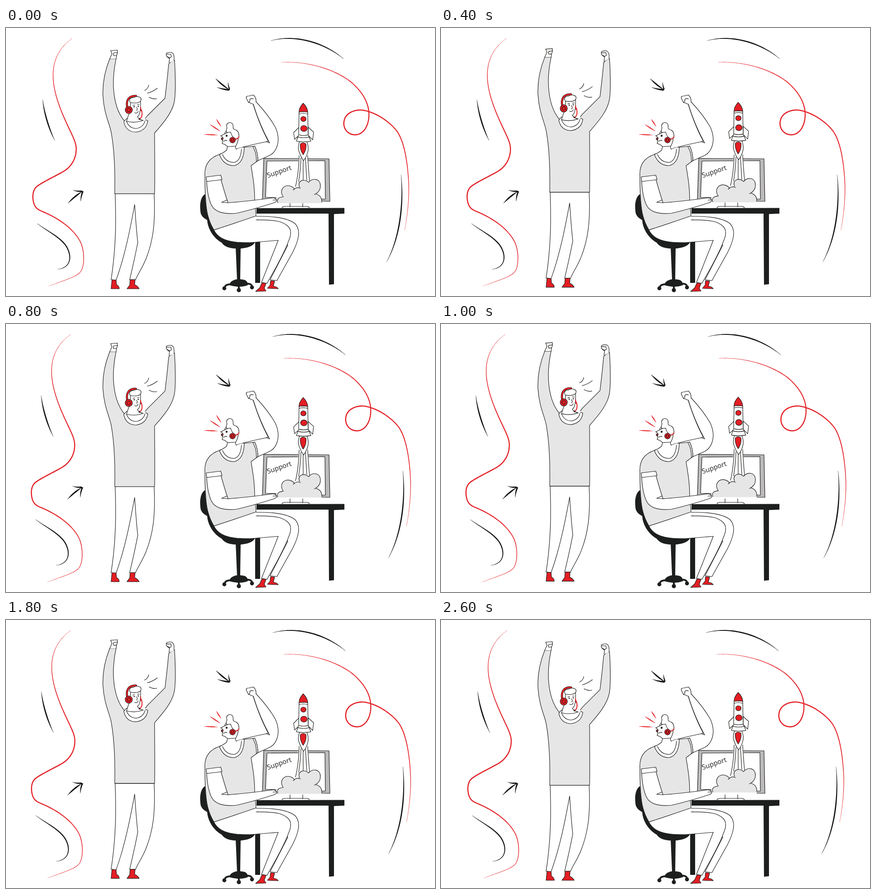
An HTML page for the animation above (2800 ms loop, 947x592 px).

```html
<!DOCTYPE html>
<html lang="en">
<head>
<meta charset="utf-8">
<title>Support launch</title>
<style>
html, body { margin: 0; width: 100%; height: 100%; overflow: hidden; background: #fff; }
svg { display: block; width: 947px; height: 592px; }
svg * { stroke-linecap: round; stroke-linejoin: round; }
path, circle, ellipse { fill: #fff; stroke: #1d1d1b; stroke-width: 1.15; }
.line { fill: none; }
.grey { fill: #e6e6e6; }
.bezel { fill: #bcbabb; }
.red { fill: #e31e24; }
.black { fill: #1d1f1f; stroke: none; }
.fill { stroke: none; }
.leg { fill: none; stroke: #1d1f1f; stroke-width: 4; }
.wire { fill: none; stroke: #e31e24; stroke-width: 2; }
.brush { fill: #111; stroke: none; }
.brush.red { fill: #e31e24; }
text { font: 15px "Open Sans", Lato, sans-serif; fill: #1d1d1b; }
</style>
</head>
<body>
<svg viewBox="0 0 947 592">
  <g id="left"></g>
  <g id="right"></g>
  <g id="arrowLeft"></g>
  <g id="arrowRight"></g>

  <g id="standing">
    <!-- trousers and boots -->
    <path d="M241 366C243 430 243 485 232 556L243 557C262 505 274 445 284 390C286 420 288 450 291 474L290 478C285 505 279 530 273 556L286 556C290 545 300 532 309 510C325 470 330 430 327 366Z"/>
    <path class="red" d="M234 556L243 557L244 567Q250 570 250 576L232 576Z"/>
    <path class="red" d="M274 556L285 556L284 567Q291 570 294 576L267 576L273 568Z"/>
    <!-- shirt -->
    <path class="grey" d="M229 68C218 95 213 125 214 150C217 195 230 212 233 235C239 270 241 320 240 366L328 366C329 320 328 280 328 232C350 207 366 187 371 165C375 150 374 100 372 71Q363 74 359 80C357 105 354 130 351 155L312 194L305 203L262 206C255 198 247 185 242 165C236 140 234 110 243 68Z"/>
    <path d="M260 207Q265 230 287 230Q310 227 313 205L307 202L266 200Z"/>
    <path d="M266 206Q272 222 288 222Q304 219 307 204"/>
    <path class="fill" d="M264 203L309 200L306 206Q287 211 267 207Z"/>
    <!-- fists -->
    <path d="M229 68L234 57L231 50L246 49L246 55L244 61L243 68"/>
    <path class="line" d="M246 54L238 55Q236 58 238 61L244 61"/>
    <path d="M360 77L361 66L354 62L354 56Q358 53 366 54Q371 58 371 64L371 72"/>
    <path class="line" d="M354 58L364 58L365 64L360 67L356 64"/>
    <!-- head -->
    <path d="M275 162L274 184Q269 195 266 206Q285 211 303 204Q294 203 290 196Q298 192 297 161Z"/>
    <path class="line" d="M268 177C264 160 271 149 287 150" style="stroke-width:4.6"/>
    <path class="wire" d="M268 177C264 160 271 149 287 150" style="stroke-width:3"/>
    <path d="M275 165C270 160 274 153 281 154C289 149 300 152 298 159C297 165 287 167 275 165Z"/>
    <circle class="red" cx="271" cy="181" r="8"/>
    <circle class="red" cx="271" cy="181" r="4"/>
    <path class="wire" d="M297 175L298 183M299 181Q303 196 295 201"/>
    <circle class="red" cx="294.5" cy="201" r="1.3"/>
    <path class="line" d="M280 171L284 170M290 169L294 169M288 175Q292 181 288 182M284 187Q289 190 292 184"/>
    <circle class="black" cx="283" cy="174" r="1.4"/><circle class="black" cx="292" cy="173" r="1.4"/>
    <path class="line" d="M315 126Q314 134 306 138M334 133Q324 141 312 144M316 153Q325 158 333 156"/>
  </g>

  <!-- monitor -->
  <path class="bezel" d="M569 288L713 289L715 383L566 378Z"/>
  <path d="M576 294L704 293L705 378L573 374Z"/>
  <path class="fill" d="M597 372L697 372L697 390L597 390Z"/>
  <text transform="translate(578 331) rotate(-19)">Support</text>
  <path d="M627 386L627 395M655 386L655 395M609 398Q610 394 616 394L664 394Q669 394 670 398"/>

  <g id="rocket">
    <path class="fill" d="M647 280L666 280L673 345L638 352Z"/>
    <path class="line" d="M647 282C647 305 643 335 639 350M651 287C651 308 648 325 646 340M656 292L656 336M661 287L664 336M666 282C667 305 669 325 670 338"/>
    <path class="grey fill" d="M600 387Q596 374 612 373C602 358 614 345 627 349Q634 351 637 356L646 350C642 338 658 331 668 341C676 330 695 332 694 350Q694 361 687 367Q698 371 697 387Z"/>
    <path class="line" d="M600 386Q596 374 612 373C602 358 614 345 627 349Q634 351 637 356M634 358Q641 350 650 354M648 351C642 338 658 331 668 341C676 330 695 332 694 350Q694 361 681 368M685 367Q698 371 697 385"/>
    <path d="M648 251Q644 262 646 270Q650 284 657 293Q665 282 667 270Q668 260 664 251Z"/>
    <path class="red" d="M650 256Q656 251 662 256Q664 268 656 280Q648 268 650 256Z"/>
    <path d="M647 219L635 231L637 246L647 237ZM667 219L679 230L677 247L667 237Z"/>
    <path d="M647 185L646 236L641 250Q657 253 673 250L667 236L666 185Z"/>
    <path class="line" d="M647 236Q657 239 667 236M645 241Q657 244 669 241M647 190Q656 187 666 190"/>
    <path class="red" d="M656 166Q646 177 647 186Q656 183 666 186Q666 176 656 166Z"/>
    <ellipse class="red" cx="656.5" cy="201" rx="6" ry="5.5"/>
    <ellipse class="red" cx="657.5" cy="222" rx="7.3" ry="6.5"/>
  </g>

  <!-- desk and chair -->
  <path class="black" d="M553 398L747 397.5L747 410L724 411L724 566L713 567L712 410L553 410ZM550 440L561 440L561 563L550 563Z"/>
  <path class="black" d="M442 366C428 370 427 395 430 410C433 418 440 422 444 424C446 447 460 465 476 474C484 486 500 488 520 487Q546 484 550 472L480 464L450 410Z"/>
  <path class="black" d="M507 484L518 484L517 555L525 556Q534 558 534 568Q515 575 493 568Q494 558 510 555Z"/>
  <path class="leg" d="M497 566Q485 566 483 572M530 565Q541 564 543 570M514 567L514 576"/>
  <circle class="black" cx="482" cy="575" r="4.4"/>
  <circle class="black" cx="514" cy="579" r="4.6"/>
  <circle class="black" cx="543" cy="573" r="4.4"/>

  <!-- seated legs -->
  <path d="M537 417C580 414 620 418 638 432C652 447 646 470 632 497L598 558L583 556L622 480L600 440Z"/>
  <path d="M459 446C470 470 500 475 540 474L601 469L564 562L576 564C590 540 615 495 624 470C634 447 627 436 605 428C585 423 560 424 537 424L552 415Z"/>
  <path class="fill" d="M462 446L552 414L554 423L500 450Z"/>
  <path class="red" d="M565 563L574 564L570 575L574 581L551 582L560 574Z"/>
  <path class="red" d="M584 558L593 559L590 570Q599 572 601 576L577 575L583 568Z"/>

  <!-- raised arm -->
  <path d="M508 268C535 258 560 255 575 251L579 250Q560 215 545 166L552 163Q580 193 595 220C608 250 597 273 583 281L554 294L540 303Z"/>
  <path class="line" d="M545 166Q560 215 582 254L575 251"/>
  <path d="M545 168L535 164L531 156Q528 150 537 150L546 148Q553 154 552 164"/>
  <path class="line" d="M535 164Q540 163 538 158Q542 154 546 157"/>

  <!-- seated shirt -->
  <path class="grey" d="M472 279C450 286 438 300 439 325C439 360 440 390 445 412Q450 432 459 446Q485 438 552 415L549 380C549 350 545 330 541 304L556 293Q556 276 549 261L520 264Z"/>
  <path d="M545 262Q553 275 553 295L556 293Q556 276 549 261Z"/>
  <path d="M471 279Q480 304 503 304Q525 300 526 263L519 264L477 277Z"/>
  <path d="M477 277Q484 297 504 297Q519 293 520 264"/>
  <path class="fill" d="M475 278L487 250L507 260L508 268L522 263L518 270L479 279Z"/>
  <path class="line" d="M489 262L487 270Q480 276 472 279M507 260Q505 266 509 268"/>

  <!-- forearm on the desk -->
  <path d="M443 338C444 360 447 378 454 392C462 408 485 412 510 409C545 401 570 393 592 386L597 383Q599 377 590 375L575 377Q530 383 490 386Q483 365 474 333Z"/>
  <path class="line" d="M488 380L476 385L490 386M589 380L597 380"/>
  <path d="M442 329L474 325L477 335L443 339Z"/>

  <!-- seated head -->
  <path d="M487 226L481 235L474 238L479 242L475 245L479 249L477 255Q486 258 489 262L507 261Q515 248 512 235Z"/>
  <path d="M487 231C484 224 490 222 487 218C486 211 492 208 496 209C504 211 500 219 502 223Q516 226 514 242L508 246Q498 241 496 230Z"/>
  <path class="red" d="M475 243L480 244L477 248Z"/>
  <path class="line" d="M483 234L489 231M481 250Q485 247 488 249"/>
  <circle class="black" cx="487" cy="238" r="2.2"/>
  <path class="wire" d="M504 245Q512 246 514 240"/>
  <circle class="red" cx="500" cy="247.5" r="6.3"/>
  <circle class="red" cx="500" cy="247.5" r="3"/>
  <g id="shout"></g>
</svg>
<script>
const $ = id => document.getElementById(id);

// Ink stroke that swells in the middle and tapers to both ends
function brush(parent, d, width, colour = "") {
  const path = document.createElementNS("http://www.w3.org/2000/svg", "path");
  path.setAttribute("d", d);
  $(parent).append(path);
  const length = path.getTotalLength(), steps = Math.ceil(length / 4);
  const sideA = [], sideB = [];
  for (let i = 0; i <= steps; i++) {
    const at = length * i / steps;
    const p = path.getPointAtLength(at);
    const a = path.getPointAtLength(Math.max(0, at - .5));
    const b = path.getPointAtLength(Math.min(length, at + .5));
    const angle = Math.atan2(b.y - a.y, b.x - a.x);
    const half = .2 + width / 2 * Math.sin(Math.PI * i / steps);
    const dx = -Math.sin(angle) * half, dy = Math.cos(angle) * half;
    sideA.push([p.x + dx, p.y + dy]);
    sideB.unshift([p.x - dx, p.y - dy]);
  }
  path.setAttribute("d", "M" + sideA.concat(sideB).join("L") + "Z");
  path.setAttribute("class", "brush " + colour);
}

brush("left", "M146 23C115 45 103 75 104 108C105 145 122 185 135 213C145 235 155 252 155 267C155 290 143 308 125 318C105 329 80 341 68 350C60 357 58 369 60 381C63 398 70 401 82 406C115 420 150 443 165 474C172 490 174 515 168 532C163 548 140 553 95 570", 2.1, "red");
brush("left", "M81 158C84 190 97 228 108 249", 2.4);
brush("left", "M69 432C90 448 120 462 133 482C147 505 143 530 114 533", 2);
brush("right", "M585 28C635 14 700 30 745 68", 2.2);
brush("right", "M609 76C660 73 720 88 760 118C790 143 803 170 801 197C799 220 787 236 770 236C752 235 744 220 746 207C748 190 765 181 783 181C810 183 845 204 863 228C880 252 887 300 889 345C890 380 886 415 880 447", 2.1, "red");
brush("right", "M872 324C879 400 866 470 840 517", 2.3);
for (const d of ["M137 387Q152 371 170 360", "M148 358Q158 362 170 360Q165 372 165 383"])
  brush("arrowLeft", d, 2.8);
for (const d of ["M463 112Q478 127 494 137", "M466 131Q480 136 494 137Q491 130 490 120"])
  brush("arrowRight", d, 2.8);
for (const d of ["M464 201L475 218", "M450 213L473 228", "M437 235L467 236.5"])
  brush("shout", d, 1.8, "red");

// Keys are [step, offset]
const STEP = 200, STEPS = 14;
const motion = {
  standing: { axis: "y", keys: [[0, 0], [4, -6.8], [6, -9], [7, -9], [9, -5.2], [14, 0]] },
  rocket: { axis: "y", keys: [[0, 0], [6, -5.5], [9, -3], [13, -6]] },
  left: { axis: "x", keys: [[0, 0], [6, -5], [7, -4.6], [10, -2.2], [11, -2.2], [13, 0]] },
  right: { axis: "x", keys: [[0, 0], [3, 4], [4, 4], [6, 5.3], [8, 4.1], [9, 4.1], [13, 0]] },
  arrowLeft: { axis: "x", keys: [[0, 0], [2, 1], [4, -1], [10, -1], [11, .6], [13, -1]] },
  arrowRight: { axis: "x", keys: [[0, 0], [2, -1], [4, 1], [13, 1]] }
};

function offsetAt(keys, step) {
  const next = keys.findIndex(key => key[0] >= step);
  if (next < 1) return keys[0][1];
  const [s0, v0] = keys[next - 1], [s1, v1] = keys[next];
  return v0 + (v1 - v0) * (step - s0) / (s1 - s0);
}

const start = performance.now();
function draw() {
  const step = Math.floor((performance.now() - start) / STEP) % STEPS;
  for (const id in motion) {
    const { axis, keys } = motion[id], v = offsetAt(keys, step);
    $(id).setAttribute("transform", axis === "x" ? `translate(${v} 0)` : `translate(0 ${v})`);
  }
  requestAnimationFrame(draw);
}
draw();
</script>
</body>
</html>
```
